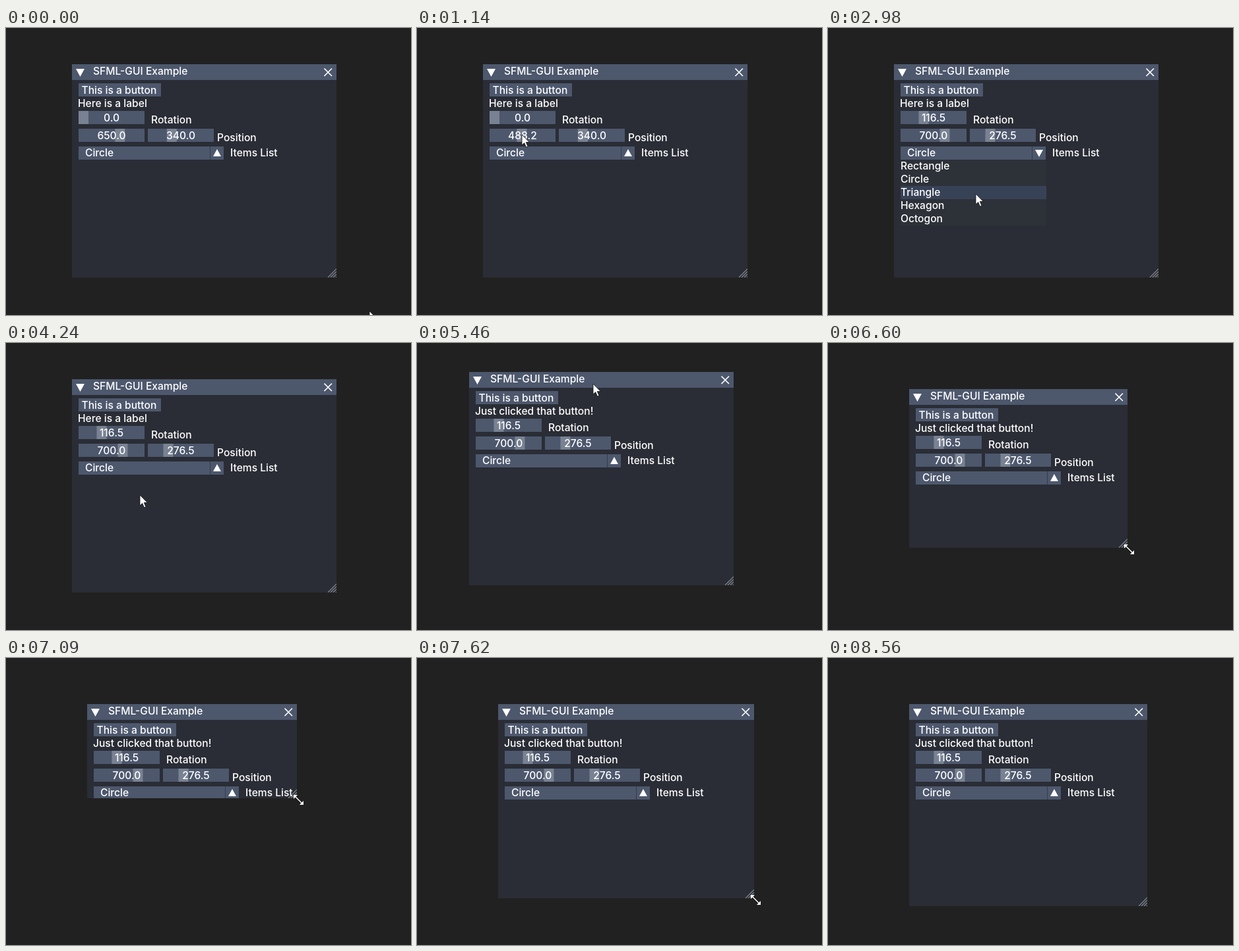
Write an HTML page with a canvas that moves like this. It is 614x436 px and loops after 8.83 s.

```html
<!DOCTYPE html>
<html lang="en">
<head>
<meta charset="utf-8">
<title>SFML-GUI Example</title>
<style>
html, body { margin: 0; width: 614px; height: 436px; overflow: hidden; background: #212121; }
canvas { display: block; }
</style>
</head>
<body>
<canvas id="stage" width="614" height="436"></canvas>
<script>
const ctx = document.getElementById('stage').getContext('2d');
const LOOP = 8830;
const BLUE = '#4d586d', HOVER = '#384257', KNOB = '#788292', WHITE = '#fff';
const ITEMS = ['Rectangle', 'Circle', 'Triangle', 'Hexagon', 'Octogon'];

// Pointer stops: time, x, y and, where it rests, the time it leaves
const PATH = [
  [0, 551, 430], [400, 320, 205], [650, 205, 98], [880, 173, 162, 920],
  [1140, 159, 162], [1350, 177, 162, 1420], [1560, 118, 139],
  [1760, 165, 139, 1830], [1990, 145, 139, 2050], [2240, 252, 164],
  [2360, 246, 164, 2410], [2620, 327, 193, 2720], [2980, 224, 252],
  [3200, 202, 285], [3430, 206, 208], [3570, 214, 245, 3640],
  [3880, 192, 272], [4150, 203, 231, 4380], [4720, 180, 95, 4850],
  [5260, 288, 73, 5300], [5430, 264, 60], [5630, 311, 88, 5690],
  [5880, 365, 239], [6120, 516, 386, 6320], [6850, 405, 235],
  [7090, 443, 215], [7180, 450, 211, 7210], [7480, 526, 305],
  [7700, 502, 384], [7980, 470, 358], [8090, 474, 366, 8120],
  [8220, 486, 379, 8280], [8540, 580, 446, LOOP]
].flatMap(([t, x, y, leave]) => leave ? [[t, x, y], [leave, x, y]] : [[t, x, y]]);

function slope(i, k) {
  const a = PATH[i - 1], b = PATH[i], c = PATH[i + 1];
  if (!a || !c) return 0;
  const m = (b[k] - a[k]) / (b[0] - a[0]), n = (c[k] - b[k]) / (c[0] - b[0]);
  return m * n > 0 ? 2 * m * n / (m + n) : 0;
}

// Smooth path without overshoot
function pointer(t) {
  let i = 0;
  while (i < PATH.length - 2 && t >= PATH[i + 1][0]) i++;
  const a = PATH[i], b = PATH[i + 1], d = b[0] - a[0], u = (t - a[0]) / d, v = 1 - u;
  const at = k => Math.round(
    v * v * (1 + 2 * u) * a[k] + u * u * (3 - 2 * u) * b[k] +
    d * u * v * (v * slope(i, k) - u * slope(i + 1, k)));
  return { x: at(1), y: at(2) };
}

function rect(x, y, w, h, color) {
  ctx.fillStyle = color;
  ctx.fillRect(x, y, w, h);
}

function text(s, x, y, align = 'left') {
  ctx.fillStyle = WHITE;
  ctx.textAlign = align;
  ctx.fillText(s, x, y);
}

function poly(points, color = WHITE) {
  ctx.beginPath();
  points.forEach(p => ctx.lineTo(...p));
  ctx.closePath();
  ctx.fillStyle = color;
  ctx.fill();
}

function lines(color, width, ...segments) {
  ctx.strokeStyle = color;
  ctx.lineWidth = width;
  ctx.beginPath();
  for (const [x1, y1, x2, y2] of segments) {
    ctx.moveTo(x1, y1);
    ctx.lineTo(x2, y2);
  }
  ctx.stroke();
}

// Slider share, set by the pointer between two times
function dragged(t, from, to, left, start) {
  if (t < from) return start;
  const x = pointer(Math.min(t, to)).x;
  return Math.max(0, Math.min(1, (x - left - 7.5) / 85));
}

function slider(x, y, share, max) {
  rect(x, y, 100, 20, BLUE);
  rect(x + share * 85, y, 15, 20, KNOB);
  text((share * max).toFixed(1), x + 50, y + 16, 'center');
}

function drawWindow(t, mouse) {
  const start = pointer(5300), held = pointer(Math.max(5300, Math.min(t, 5690)));
  const left = 100 + held.x - start.x, top = 55 + held.y - start.y;
  let w = 401, h = 324;
  if (t >= 6350) {
    const corner = pointer(Math.min(t, 8230));
    w = corner.x - 2 - left;
    h = corner.y - 2 - top;
  }
  const mx = mouse.x - left, my = mouse.y - top;
  const over = (x, y, bw, bh) => mx >= x && mx < x + bw && my >= y && my < y + bh;
  const open = t >= 2720 && t < 4210;

  ctx.save();
  ctx.translate(left, top);
  ctx.beginPath();
  ctx.rect(0, 0, w, h);
  ctx.clip();

  rect(0, 0, w, h, '#2a2d35');
  rect(0, 0, w, 24, BLUE);
  poly([[6, 7], [19, 7], [12.5, 19]]);
  text('SFML-GUI Example', 32, 16);
  lines(WHITE, 1.7, [w - 18.5, 6.5, w - 7, 18], [w - 7, 6.5, w - 18.5, 18]);

  for (const n of [13, 9, 5, 1]) lines('#858a91', 1.2, [w - n, h, w, h - n]);

  rect(10, 29, 125, 20, over(10, 29, 125, 20) ? HOVER : BLUE);
  text('This is a button', 14.5, 45);
  text(t < 4780 ? 'Here is a label' : 'Just clicked that button!', 9, 65);

  slider(10, 71, dragged(t, 1580, 2050, 110, 0), 360);
  text('Rotation', 120, 90);
  slider(10, 98, dragged(t, 920, 1420, 110, .65), 1000);
  slider(115, 98, dragged(t, 2240, 2410, 215, .34), 1000);
  text('Position', 220, 117);

  rect(10, 125, 220, 20, BLUE);
  rect(209, 125, 1, 20, '#343c4b');
  text('Circle', 20, 140);
  text('Items List', 240, 140);
  if (open) {
    poly([[214, 130], [226, 130], [220, 141]]);
    ITEMS.forEach((item, i) => {
      const y = 145 + 20 * i;
      rect(10, y, 221, 20, over(10, y, 221, 20) ? HOVER : '#2d3138');
      text(item, 10, y + 15);
    });
  } else {
    poly([[214, 140], [226, 140], [220, 129]]);
  }
  ctx.restore();
}

function drawPointer(t, { x, y }) {
  ctx.save();
  ctx.translate(x, y);
  if (t >= 6090 && t < 8290) {
    lines('#111', 3.5, [-5, -5, 5, 5]);
    lines(WHITE, 1.6, [-5, -5, 6, 6]);
    poly([[-7, -7], [-1, -7], [-7, -1]]);
    poly([[8, 8], [2, 8], [8, 2]]);
  } else {
    poly([[0, 0], [0, 16], [3.7, 12.6], [6.5, 19], [9, 18], [6.3, 11.6], [11.3, 11.6]]);
    ctx.strokeStyle = '#111';
    ctx.lineWidth = .8;
    ctx.stroke();
  }
  ctx.restore();
}

let begin;
function frame(now) {
  begin ??= now;
  const t = (now - begin) % LOOP, mouse = pointer(t);
  ctx.font = '500 15.6px Inter, "Open Sans", sans-serif';
  rect(0, 0, 614, 436, '#212121');
  drawWindow(t, mouse);
  drawPointer(t, mouse);
  requestAnimationFrame(frame);
}
requestAnimationFrame(frame);
</script>
</body>
</html>
```
